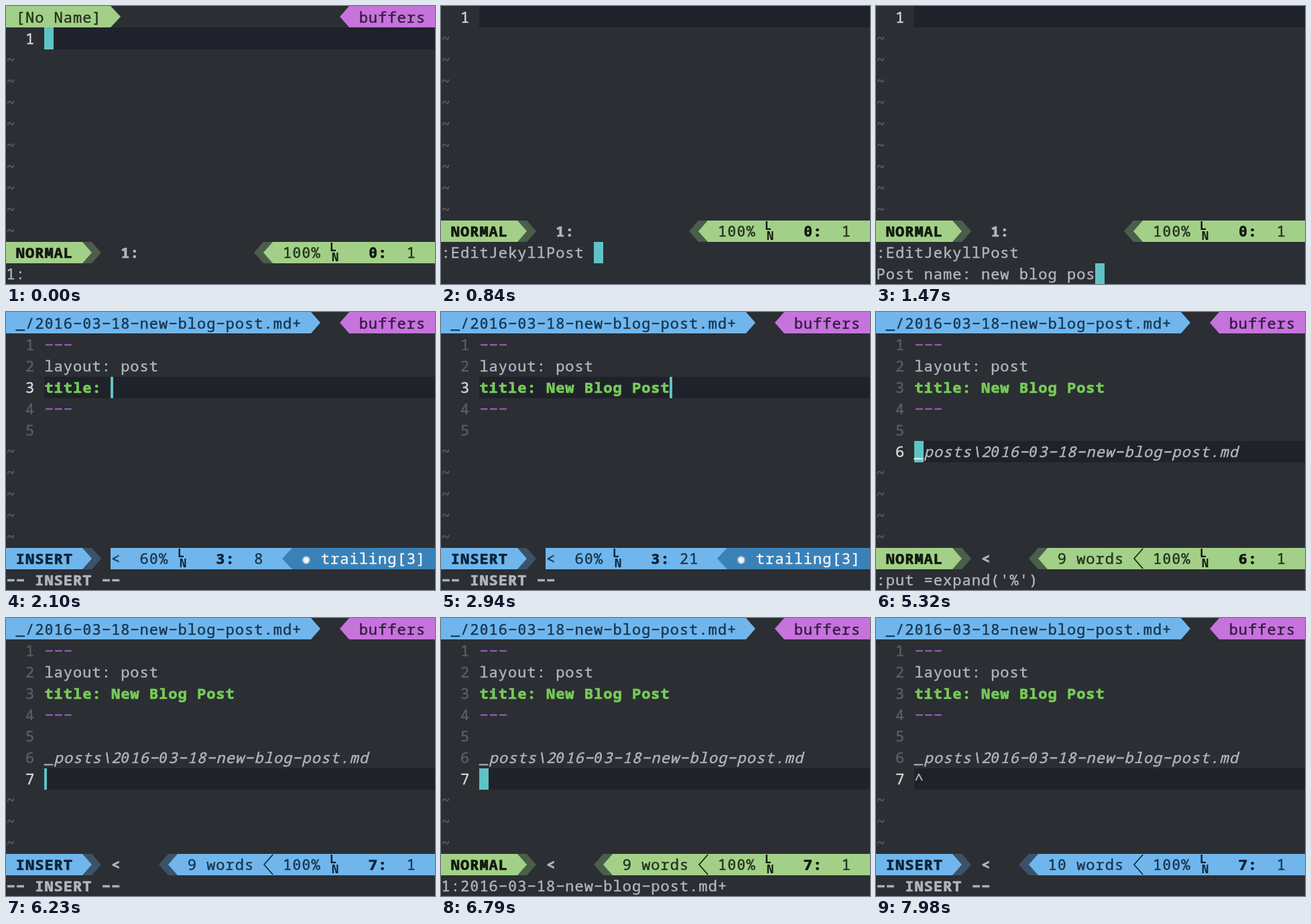
Recreate the animation shown at these times as an HTML page with a canvas. Size 640 px wide and 416 px high, loop 8 s.

```html
<!DOCTYPE html>
<html lang="en">
<head>
<meta charset="utf-8">
<title>Editing a blog post</title>
<style>
html, body { margin: 0; width: 100%; height: 100%; overflow: hidden; background: #2b2e33; }
canvas { display: block; }
</style>
</head>
<body>
<canvas id="stage" width="640" height="416"></canvas>
<script>
const ctx = document.getElementById('stage').getContext('2d');
const LOOP = 8000, STEP = 70;
const CELL = 14.22, ROW = 32, STATUS = 11, CMD = 12, TEXT_COL = 4;

const C = {
  bg: '#2b2e33', line: '#20222b', text: '#b0b5be', dim: '#5b5e65', bright: '#d6d9dd',
  title: '#76cb57', rule: '#9a5fb4', cursor: '#5fc3c6',
  purple: '#c673dc', purpleInk: '#331c40', trail: '#3a81b8', white: '#f0f4f8'
};
const MODES = {
  NORMAL: { fill: '#a2d088', mid: '#4b5e4a', ink: '#11190f', soft: '#24321f' },
  INSERT: { fill: '#70b6ec', mid: '#3c526a', ink: '#0c243a', soft: '#183751' }
};

const FILE = '2016-03-18-new-blog-post.md';
const EDIT = ':EditJekyllPost ';
const PROMPT = 'Post name: ';
const NAME = 'new blog post';
const TITLE = 'New Blog Post';
const PUT = ":put =expand('%')";

const colX = c => Math.round(c * CELL);
// The tab line is flush with the top; the window below starts right under it.
const rowY = r => r > 1 ? r * ROW + 1 : r * ROW;

function fill(col, row, cols, color) {
  const x = colX(col), y = rowY(row);
  ctx.fillStyle = color;
  ctx.fillRect(x, y, colX(col + cols) - x, rowY(row + 1) - y);
}

// One glyph per terminal cell, slightly thickened. Zeros come from a face
// with a dotted zero, and hyphens are drawn long at figure height.
function text(str, col, row, color, style = '') {
  ctx.fillStyle = ctx.strokeStyle = color;
  ctx.lineWidth = style === 'bold' ? 0.7 : 0.45;
  ctx.lineJoin = 'round';
  ctx.textAlign = 'center';
  [...str].forEach((ch, i) => {
    ctx.font = ch === '0'
      ? `${style} 21px "DejaVu Sans Mono", monospace`
      : `${style} 22px "Noto Sans Mono", "DejaVu Sans Mono", monospace`;
    const glyph = ch === '-' ? '−' : ch;
    const x = (col + i + 0.5) * CELL, y = row * ROW + 25;
    ctx.fillText(glyph, x, y);
    ctx.strokeText(glyph, x, y);
  });
}

function arrow(col, row, dir, color) {
  const base = colX(dir > 0 ? col : col + 1), tip = colX(dir > 0 ? col + 1 : col);
  const top = rowY(row), bottom = rowY(row + 1);
  ctx.fillStyle = color;
  ctx.beginPath();
  ctx.moveTo(base, top);
  ctx.lineTo(tip, (top + bottom) / 2);
  ctx.lineTo(base, bottom);
  ctx.fill();
}

function chevron(col, row, color) {
  const x = colX(col), y = rowY(row);
  ctx.strokeStyle = color;
  ctx.lineWidth = 1.6;
  ctx.beginPath();
  ctx.moveTo(x + CELL, y + 1);
  ctx.lineTo(x + 1, y + 16);
  ctx.lineTo(x + CELL, y + 31);
  ctx.stroke();
}

function lineSign(col, row, color) {
  ctx.fillStyle = color;
  ctx.textAlign = 'left';
  ctx.font = 'bold 17px "Noto Sans Mono", monospace';
  ctx.fillText('L', colX(col), rowY(row) + 14);
  ctx.fillText('N', colX(col) + 3, rowY(row) + 29);
}

// Number of characters typed when the first appears at `start`.
const typed = (t, start, gap, str) =>
  str.slice(0, t < start ? 0 : Math.floor((t - start) / gap) + 1);

function stateAt(t) {
  const s = { mode: 'NORMAL', file: t >= 1610, lines: [''], line: 1, col: 1,
              cmd: '', typing: false, shift: 0, words: 0, prompt: '' };

  if (!s.file) {
    s.cmd = t < 70 ? '1:' : typed(t, 70, 45, EDIT);
    s.typing = t >= 70;
    s.shift = t >= 840 ? 1 : 0;
    if (t >= 910) s.prompt = PROMPT + typed(t, 980, 42, NAME);
    return s;
  }

  const title = typed(t, 2170, 60, TITLE);
  s.lines = ['---', 'layout: post', 'title: ' + title, '---', ''];
  s.line = 3;
  s.col = 8 + title.length;
  if (t < 3080) {
    s.mode = 'INSERT';
    s.trailing = true;
    return s;
  }
  s.words = 8;
  s.cmd = '1:' + FILE + '+';
  s.col = 20;
  if (t >= 3290) { s.line = 5; s.col = 1; }
  if (t >= 3640) { s.cmd = typed(t, 3640, 80, PUT); s.typing = t < 5180; }
  if (t >= 5180) {
    s.lines.push('_posts\\' + FILE);
    s.line = 6;
    s.words = 9;
  }
  if (t >= 6160) {
    s.lines.push('');
    s.line = 7;
    s.mode = t < 6440 || t >= 7140 ? 'INSERT' : 'NORMAL';
    s.cmd = '1:' + FILE + '+';
  }
  if (t >= 7420) {
    s.lines[6] = '^';
    s.words = 10;
    s.hideCursor = true;
  }
  return s;
}

function drawTabs(s) {
  const label = s.file ? '_/' + FILE + '+' : '[No Name]';
  const look = s.file ? MODES.INSERT : MODES.NORMAL;
  const end = label.length + 2;
  fill(0, 0, end, look.fill);
  arrow(end, 0, 1, look.fill);
  text(label, 1, 0, look.soft);
  arrow(35, 0, -1, C.purple);
  fill(36, 0, 10, C.purple);
  text('buffers', 37, 0, C.purpleInk);
}

function lineStyle(n) {
  if (n === 3) return [C.title, 'bold'];
  if (n === 1 || n === 4) return [C.rule, ''];
  return [C.text, n === 6 ? 'italic' : ''];
}

function drawBuffer(s) {
  for (let n = 1; n <= 10; n++) {
    const row = n - s.shift, current = n === s.line;
    if (n > s.lines.length) {
      text('~', 0, row, C.dim);
      continue;
    }
    if (current) fill(TEXT_COL, row, 42, C.line);
    text(String(n), 2, row, current ? C.bright : C.dim, current ? '500' : '');
    text(s.lines[n - 1], TEXT_COL, row, ...lineStyle(n));
  }
  if (s.typing || s.hideCursor) return;
  const col = TEXT_COL + s.col - 1;
  if (s.mode === 'INSERT') {
    fill(col, s.line, 0.28, C.cursor);
  } else {
    fill(col, s.line, 1, C.cursor);
    const under = s.lines[s.line - 1][s.col - 1];
    if (under) text(under, col, s.line, C.white, lineStyle(s.line)[1]);
  }
}

// Percentage, line and column; `col` is where the percentage begins.
function drawPosition(s, col, row, look) {
  const pct = Math.round(s.line / s.lines.length * 100);
  text(`${pct}%`.padStart(4), col, row, look.soft);
  lineSign(col + 5, row, look.ink);
  text((s.file ? s.line : 0) + ':', col + 9, row, look.ink, 'bold');
  text(String(s.col).padStart(3), col + 11, row, look.soft);
}

function drawStatus(s) {
  const row = STATUS - s.shift, look = MODES[s.mode];
  fill(0, row, 8, look.fill);
  fill(8, row, 1, look.mid);
  arrow(8, row, 1, look.fill);
  arrow(9, row, 1, look.mid);
  text(s.mode, 1, row, look.ink, 'bold');

  if (s.trailing) {
    fill(11, row, 19, look.fill);
    text('<', 11, row, look.soft);
    drawPosition(s, 13, row, look);
    arrow(29, row, -1, C.trail);
    fill(30, row, 16, C.trail);
    text('✹', 31, row, C.white);
    text('trailing[3]', 33, row, C.white, '500');
    return;
  }

  const words = s.words ? s.words + ' words' : '';
  const start = words ? 26 - words.length : 29;
  text(words ? '<' : '1:', words ? 11 : 12, row, C.text, 'bold');
  arrow(start - 3, row, -1, look.mid);
  fill(start - 2, row, 1, look.mid);
  arrow(start - 2, row, -1, look.fill);
  fill(start - 1, row, 46 - start, look.fill);
  if (words) {
    text(words, start, row, look.soft);
    chevron(27, row, look.ink);
  }
  drawPosition(s, 29, row, look);
}

function drawCommand(s) {
  if (s.mode === 'INSERT') {
    text('-- INSERT --', 0, CMD, C.text, 'bold');
    return;
  }
  const row = CMD - s.shift;
  text(s.cmd, 0, row, C.text);
  if (s.prompt) text(s.prompt, 0, CMD, C.text);
  if (s.typing) {
    const at = s.prompt || s.cmd;
    fill(at.length, s.prompt ? CMD : row, 1, C.cursor);
  }
}

function draw(t) {
  const s = stateAt(t);
  ctx.fillStyle = C.bg;
  ctx.fillRect(0, 0, 640, 416);
  if (!s.shift) drawTabs(s);
  drawBuffer(s);
  drawStatus(s);
  drawCommand(s);
}

function tick() {
  const t = performance.now() % LOOP;
  draw(Math.floor(t / STEP) * STEP);
  requestAnimationFrame(tick);
}
tick();
</script>
</body>
</html>
```
